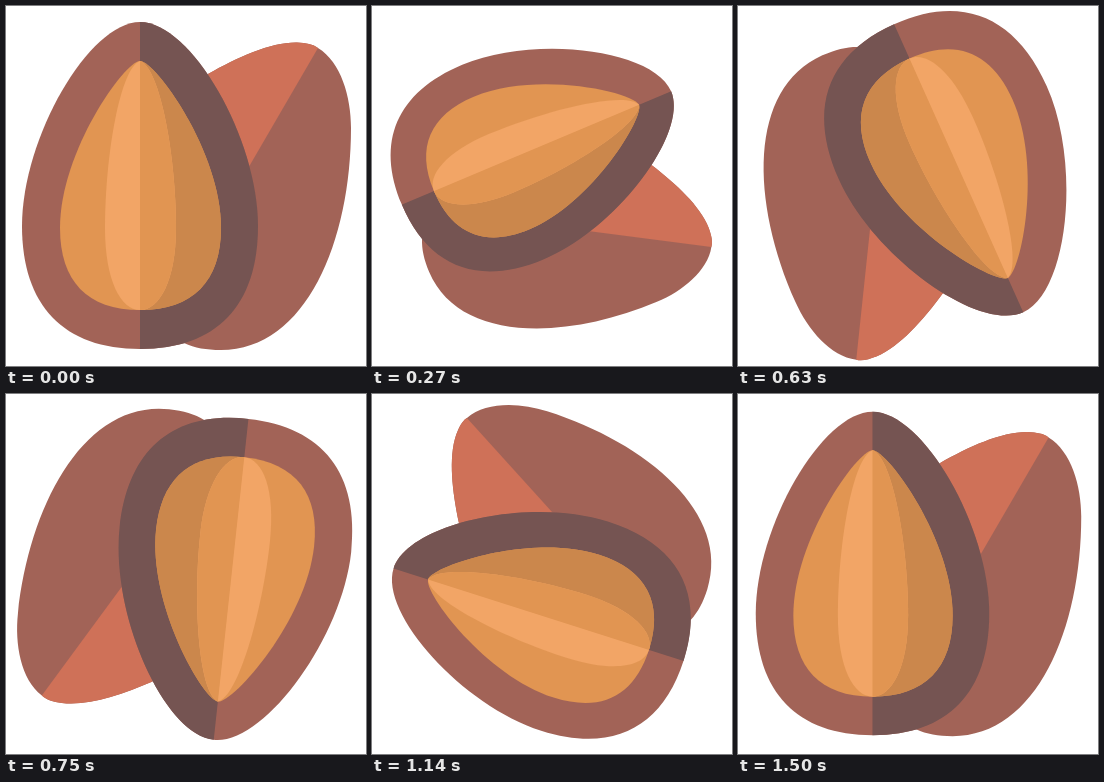
Recreate the animation shown at these times as an HTML page. Size 360 by 360 pixels, loop 1530 ms.

```html
<!DOCTYPE html>
<html lang="en">
<head>
<meta charset="utf-8">
<title>Spinning almonds</title>
<style>
  html, body { margin: 0; width: 100%; height: 100%; overflow: hidden; background: #fff; }
  svg { display: block; width: 100%; height: 100%; }
</style>
</head>
<body>
<svg viewBox="0 0 360 360">
  <defs>
    <clipPath id="right"><rect x="134" y="0" width="226" height="360"/></clipPath>
    <path id="shell" d="M134 16C185 16 252 132 252 220C252 300 210 343 134 343C58 343 16 300 16 220C16 132 83 16 134 16Z"/>
    <path id="kernel" d="M134 55C149 55 215 145 215 222C215 275 187 304 134 304C81 304 54 275 54 222C54 145 119 55 134 55Z"/>
    <path id="lens" d="M134 55C154 62 170 150 170 222C170 275 153 304 134 304C115 304 99 275 99 222C99 150 114 62 134 55Z"/>
  </defs>
  <g id="nuts">
    <path fill="#a26357" d="M202 68C232 51 265 36 291 36.5C300 37 307 38 312 42C335 56 345 91 345 122C345 235 300 344 215 344C200 344 189 342 178 337L134 200Z"/>
    <path fill="#cf7158" d="M202 68C232 51 265 36 291 36.5C300 37 307 38 312 42L230 183L180 120Z"/>
    <use href="#shell" fill="#a26357"/>
    <use href="#shell" fill="#755452" clip-path="url(#right)"/>
    <use href="#kernel" fill="#e19552"/>
    <use href="#kernel" fill="#cb874c" clip-path="url(#right)"/>
    <use href="#lens" fill="#f2a566"/>
    <use href="#lens" fill="#e19552" clip-path="url(#right)"/>
  </g>
</svg>
<script>
  const LOOP = 1530, STEP = 30, SPIN = 1420;
  // turning points of the pulse: time in ms, scale
  const pulse = [[0, 1], [345, 0.88], [750, 0.987], [1080, 0.928], [LOOP, 0.99]];
  const nuts = document.getElementById("nuts");

  const ease = u => (1 - Math.cos(Math.PI * u)) / 2;

  // one full turn, slightly slower at first, then a short rest
  function angleAt(t) {
    const u = Math.min(t / SPIN, 1);
    return 360 * u - 4 * Math.sin(Math.PI * u) ** 2;
  }

  function scaleAt(t) {
    const i = pulse.findIndex(p => p[0] > t);
    const [t0, s0] = pulse[i - 1], [t1, s1] = pulse[i];
    return s0 + (s1 - s0) * ease((t - t0) / (t1 - t0));
  }

  function draw(time) {
    const t = Math.floor((time % LOOP) / STEP) * STEP;
    nuts.setAttribute("transform",
      `translate(180 180) rotate(${angleAt(t)}) scale(${scaleAt(t)}) translate(-180 -180)`);
  }

  const start = performance.now();
  function tick() {
    draw(performance.now() - start);
    requestAnimationFrame(tick);
  }
  tick();
</script>
</body>
</html>
```
